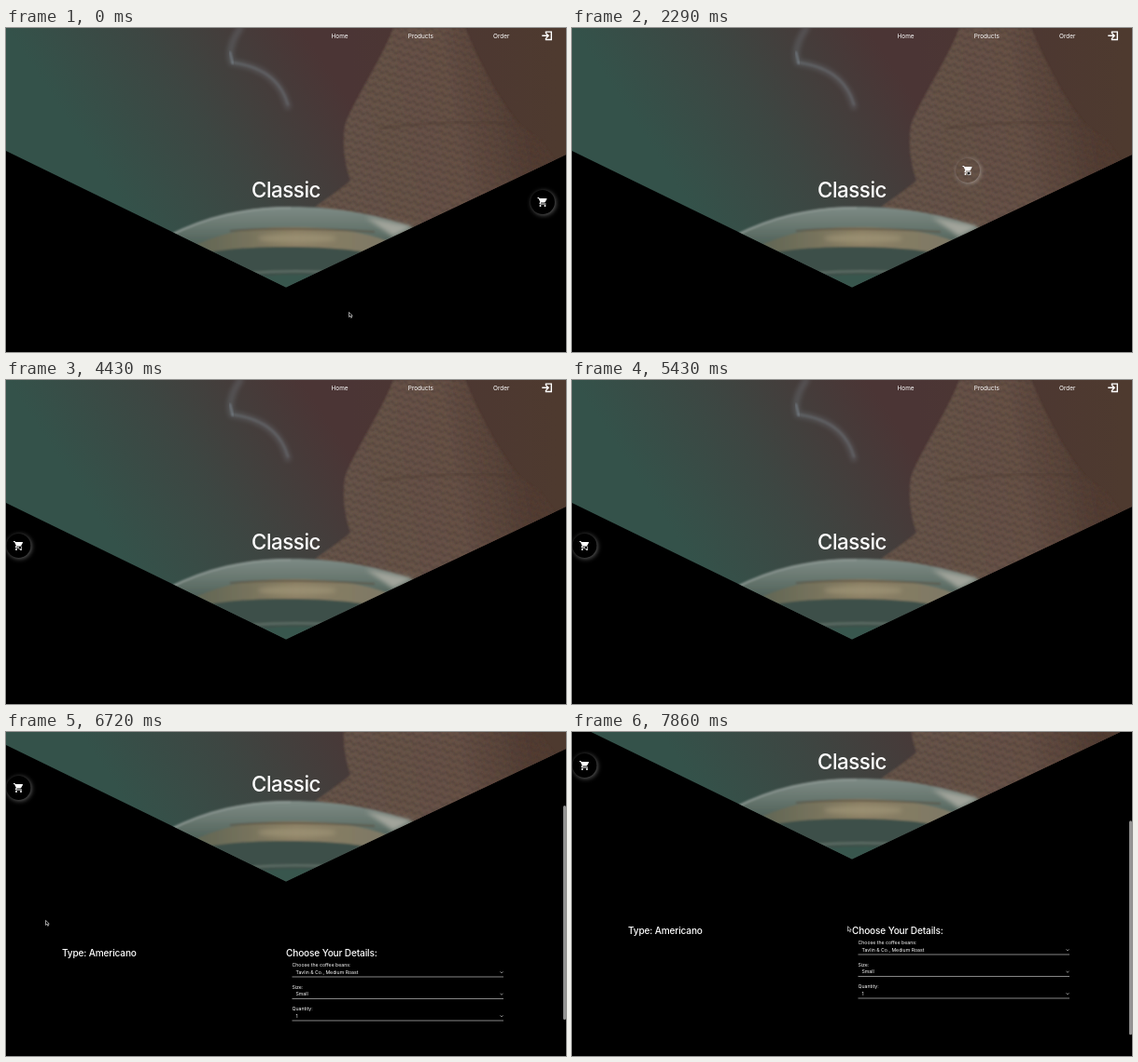
An HTML page for the animation above (8000 ms loop, 600x348 px).

```html
<!DOCTYPE html>
<html lang="en">
<head>
<meta charset="utf-8">
<title>Coffee order page</title>
<style>
  html, body { margin: 0; width: 100%; height: 100%; overflow: hidden; background: #000; }
  body { position: relative; }
  #page, #page > svg, #cart, #bar, #cursor { position: absolute; left: 0; top: 0; }
  svg { display: block; overflow: visible; }
  text { fill: #fff; font-family: Inter, Roboto, sans-serif; }
  .nav { font-size: 6.45px; }
  .title { font-size: 22.3px; font-weight: 500; letter-spacing: -.02em; text-anchor: middle; }
  .head { font-size: 10.1px; font-weight: 500; letter-spacing: -.015em; }
  .field text { font-size: 5.2px; }
  #cart { width: 26px; height: 26px; margin: -13px; border-radius: 50%;
          box-shadow: 1px 1px 5px rgba(255, 255, 255, .38); }
  #cart svg { position: absolute; left: 7px; top: 7px; }
  #bar { left: 597px; width: 2.5px; height: 230px; border-radius: 2px; background: #929292; }
</style>
</head>
<body>
<div id="page">
  <svg width="600" height="520" viewBox="0 0 600 520">
    <defs>
      <linearGradient id="wall" gradientUnits="userSpaceOnUse" x1="110" y1="165" x2="330" y2="20">
        <stop offset="0" stop-color="#34524a"/>
        <stop offset=".45" stop-color="#3d4642"/>
        <stop offset="1" stop-color="#4b3535"/>
      </linearGradient>
      <linearGradient id="warm" gradientUnits="userSpaceOnUse" x1="370" y1="0" x2="590" y2="0">
        <stop offset="0" stop-color="#4e3a2f" stop-opacity="0"/>
        <stop offset="1" stop-color="#4e3a2f"/>
      </linearGradient>
      <linearGradient id="sleeve" gradientUnits="userSpaceOnUse" x1="365" y1="110" x2="555" y2="80">
        <stop offset="0" stop-color="#68564c"/>
        <stop offset=".6" stop-color="#675247"/>
        <stop offset="1" stop-color="#523d33"/>
      </linearGradient>
      <linearGradient id="rim" gradientUnits="userSpaceOnUse" x1="0" y1="191" x2="0" y2="236">
        <stop offset="0" stop-color="#7f8c87"/>
        <stop offset=".5" stop-color="#68776f"/>
        <stop offset="1" stop-color="#4b5e56"/>
      </linearGradient>
      <linearGradient id="crema" gradientUnits="userSpaceOnUse" x1="200" y1="0" x2="420" y2="0">
        <stop offset="0" stop-color="#5f6554"/>
        <stop offset=".5" stop-color="#8a7e63"/>
        <stop offset="1" stop-color="#7c7866"/>
      </linearGradient>
      <pattern id="knit" width="9" height="8" patternUnits="userSpaceOnUse" patternTransform="rotate(14)">
        <path d="M0 2l4.5 1.6M4.5 6l4.5-1.6" stroke="#3f302b" stroke-width="2" opacity=".6"/>
      </pattern>
      <clipPath id="chevron"><path d="M0 0H600V136L300 278.5 0 132Z"/></clipPath>
      <filter id="soft"><feGaussianBlur stdDeviation="1"/></filter>
      <filter id="haze" x="-50%" y="-50%" width="200%" height="200%"><feGaussianBlur stdDeviation="2.4"/></filter>
      <path id="arm" d="M415 0C402 35 370 82 363 105Q359 135 369 164Q352 178 331 192L430 224 590 145 572 120 549 103Q517 62 492 0Z"/>
    </defs>

    <g clip-path="url(#chevron)">
      <path fill="url(#wall)" d="M0 0H600V280H0Z"/>
      <path fill="url(#warm)" d="M340 0H600V200H340Z"/>
      <use href="#arm" fill="url(#sleeve)" filter="url(#soft)"/>
      <use href="#arm" fill="url(#knit)" filter="url(#soft)"/>
      <path d="M400 108Q470 98 549 103" fill="none" stroke="#49382f" stroke-width="2" opacity=".5" filter="url(#soft)"/>
      <g fill="none" stroke="#8795a0" stroke-linecap="round">
        <path d="M251 0Q236 22 242 37C265 40 293 50 302 84" stroke-width="7" opacity=".25" filter="url(#haze)"/>
        <path d="M242 37C265 40 293 50 302 82" stroke-width="2.5" opacity=".25" filter="url(#soft)"/>
        <path d="M240 26L243 38" stroke-width="2" opacity=".6" filter="url(#soft)"/>
      </g>
      <g filter="url(#soft)">
        <path d="M165 229C210 204 255 192 305 192C355 192 400 200 445 218V285H165Z" fill="url(#rim)"/>
        <path d="M175 223C215 203 255 193 305 193" fill="none" stroke="#8e9994" stroke-width="2"/>
        <path d="M190 240Q235 214 300 214Q370 213 412 230L418 246H185Z" fill="url(#crema)"/>
        <path d="M240 218Q300 213 395 219" fill="none" stroke="#5a5040" stroke-width="2" opacity=".7"/>
        <path d="M190 246Q245 234 300 235Q360 234 415 246L400 285H200Z" fill="#3c5049"/>
        <path d="M262 263Q300 260 345 262" fill="none" stroke="#5c6b63" stroke-width="2.5"/>
        <path d="M258 269Q300 263 345 266V285H258Z" fill="#38564e"/>
      </g>
      <g filter="url(#haze)">
        <ellipse cx="312" cy="226" rx="42" ry="5" fill="#a09678" opacity=".7"/>
        <path d="M385 203L436 213 415 224Z" fill="#a2a49b"/>
      </g>
    </g>

    <g class="nav">
      <text x="348.5" y="10.8">Home</text>
      <text x="430.8" y="10.8">Products</text>
      <text x="522" y="10.8">Order</text>
    </g>
    <path d="M578.5 5.9V4.1H584.3V12.5H578.5V10.7M574.3 8.3H581M578.8 5.9L581.2 8.3 578.8 10.7"
          fill="none" stroke="#fff" stroke-width="1.4"/>
    <text class="title" x="300" y="182">Classic</text>
    <text class="head" x="60" y="359">Type: Americano</text>
    <text class="head" x="300" y="359">Choose Your Details:</text>
    <g id="form"></g>
  </svg>

  <div id="cart">
    <svg width="12" height="12" viewBox="0 0 24 24" fill="#fff">
      <path d="M1 2v2h2l3.6 7.6-1.4 2.4c-.7 1.3.3 3 1.8 3h12v-2H7.4l.8-2h7.4c.8 0 1.4-.4 1.8-1l3.6-6.5c.3-.7-.2-1.5-1-1.5H5.2l-.9-2z"/>
      <circle cx="7" cy="20" r="2"/><circle cx="17" cy="20" r="2"/>
    </svg>
  </div>
</div>
<div id="bar"></div>
<svg id="cursor" width="8" height="8" stroke="#ddd" stroke-width=".7" fill="#000">
  <path id="arrow" d="M.5 .3V5.4L1.8 4.3 2.7 6.3 3.6 5.9 2.7 4H4.3Z"/>
  <circle id="hand" r="1.8"/>
</svg>

<script>
const $ = id => document.getElementById(id);
const LOOP = 8000, STEP = 1000 / 7;

// Each key is [time, ...values]
const cartKeys = [
  [1430, 575, 187], [2290, 424, 153], [3430, 122, 131], [4000, 35, 165], [4290, 13.5, 178]
];
const cursorKeys = [
  [150, 367, 305], [570, 539, 196], [710, 539, 196], [860, 575, 189], [1430, 575, 189],
  [2290, 425, 156], [3430, 111, 135], [4000, 30, 168], [4290, 15, 180], [5430, 15, 180],
  [5860, 42, 202], [7570, 42, 202], [7720, 170, 206], [7860, 295, 208.5]
];
const scrollKeys = [
  [6290, 0], [6430, 19], [6570, 75], [6720, 118], [6860, 133], [7000, 139], [7140, 142]
];

function sample(keys, time) {
  const next = keys.findIndex(key => key[0] > time);
  if (next === 0) return keys[0].slice(1);
  if (next < 0) return keys[keys.length - 1].slice(1);
  const a = keys[next - 1], b = keys[next];
  const mix = (time - a[0]) / (b[0] - a[0]);
  return a.slice(1).map((value, i) => value + (b[i + 1] - value) * mix);
}

const place = (element, x, y) => element.style.transform = `translate(${x}px, ${y}px)`;

const fields = [
  ['Choose the coffee beans:', 'Tavlin &amp; Co., Medium Roast'], ['Size:', 'Small'], ['Quantity:', '1']
];
$('form').innerHTML = fields.map(([label, value], i) => `
  <g class="field" transform="translate(306.5 ${370.3 + i * 23.5})">
    <text>${label}</text><text x="4" y="7.6">${value}</text>
    <path d="M0 10.7H226.5" stroke="#aaa" stroke-width=".8"/>
    <path d="M223 5.2L224.5 6.5 226 5.2" fill="none" stroke="#ccc" stroke-width=".7"/>
  </g>`).join('');

function draw(now) {
  // The picture advances seven times a second, on whole hundredths
  const step = Math.floor((now % LOOP + 5) / STEP);
  const time = Math.ceil(step * STEP / 10) * 10 % LOOP;
  const [scroll] = sample(scrollKeys, time);
  const dragging = time > 850 && time < 5500;
  place($('page'), 0, -scroll);
  place($('cart'), ...sample(cartKeys, time));
  place($('cursor'), ...sample(cursorKeys, time));
  place($('bar'), 0, scroll * .67);
  $('bar').style.visibility = scroll > 1 ? 'visible' : 'hidden';
  $('arrow').style.display = dragging ? 'none' : '';
  $('hand').style.display = dragging ? '' : 'none';
}

const start = performance.now();
function tick() {
  draw(performance.now() - start);
  requestAnimationFrame(tick);
}
tick();
</script>
</body>
</html>
```
